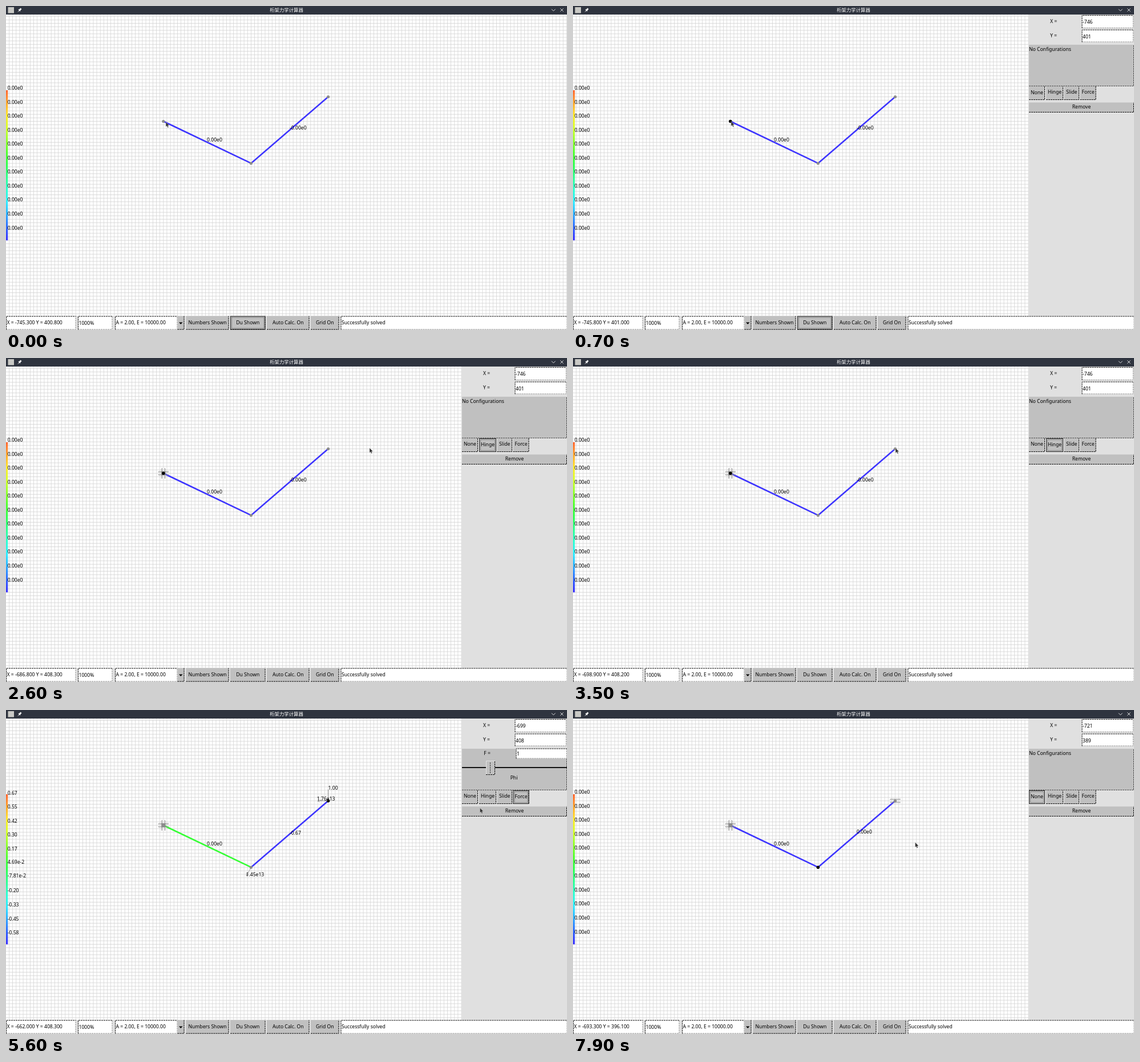
Write an HTML page with a canvas that moves like this. It is 983 by 569 pixels and loops after 8000 ms.

```html
<!DOCTYPE html>
<html lang="zh">
<head>
<meta charset="utf-8">
<title>桁架力学计算器</title>
<style>
html, body { margin: 0; width: 100%; height: 100%; overflow: hidden; background: #e0e0e0 }
canvas { display: block }
</style>
</head>
<body>
<canvas id="stage" width="983" height="569"></canvas>
<script>
const g = document.getElementById('stage').getContext('2d');
const LOOP = 8000, UNIT = 6.144, PANEL = 798;
const FACE = '#c0c0c0', BLUE = '#3c33ff', GREEN = '#33ff33', GRAY = '#8c8c8c';

// World and screen coordinates
const sx = X => 275.8 + (X + 746) * UNIT;
const sy = Y => 202.5 - (Y - 401) * UNIT;
const nodes = [[-746, 401], [-699, 408], [-721, 389]].map(([X, Y]) => ({ X, Y, x: sx(X), y: sy(Y) }));

// Pointer moves: start ms, end ms, x, y
const moves = [
  [0, 200, 278.5, 203], [300, 500, 277, 202.5],
  [800, 1000, 537, 182], [1100, 1300, 750, 176], [1400, 1495, 795, 165], [1500, 1900, 845.5, 153.5],
  [2200, 2600, 637, 158], [2900, 3000, 567.5, 157], [3100, 3495, 565.2, 158.3],
  [3900, 3995, 791.9, 157.6], [4000, 4100, 838, 158.5], [4200, 4700, 900, 155],
  [5500, 5600, 830.5, 172], [5600, 5900, 872, 153], [6100, 6400, 730, 168],
  [6400, 6595, 420.2, 234.4], [6595, 6600, 411.5, 241], [6600, 6700, 425, 268], [6800, 7000, 430, 276],
  [7400, 7600, 470, 262], [7700, 7895, 599.6, 232.6]
];

function pointer(t) {
  let x = 280.1, y = 203.7;
  for (const [a, b, nx, ny] of moves) {
    if (t <= a) break;
    const k = Math.min(1, (t - a) / (b - a));
    x += (nx - x) * k;
    y += (ny - y) * k;
  }
  return { x, y };
}

// The readout trails the pointer and freezes while it is over the panel
function readout(t) {
  let p = pointer(t - 5);
  while (p.x >= PANEL && t > 0) p = pointer((t -= 100) - 5);
  const X = -746 + (p.x - 275.8) / UNIT, Y = 401 - (p.y - 202.5) / UNIT;
  return `X = ${X.toFixed(1)}00 Y = ${Y.toFixed(1)}00`;
}

const format = v => Math.abs(v) < .1 ? v.toExponential(2).replace('+', '') : v.toFixed(2);

function rect(x, y, w, h, color) {
  g.fillStyle = color;
  g.fillRect(x, y, w, h);
}

function line(points, color, width = .7, dash = []) {
  g.beginPath();
  points.forEach(([x, y]) => g.lineTo(x, y));
  g.strokeStyle = color;
  g.lineWidth = width;
  g.setLineDash(dash);
  g.stroke();
  g.setLineDash([]);
}

function text(s, x, y, align = 'left', color = '#000', size = 8.6) {
  g.font = `${size}px "Noto Sans", "Noto Sans CJK SC", sans-serif`;
  g.textAlign = align;
  g.fillStyle = color;
  g.fillText(s, x, y);
}

// Plain decimals sit a little lower than exponent notation
const value = (s, x, y) => text(s, x, y + (s.includes('e') ? 0 : 1.5));

function dot(x, y, r, color) {
  g.beginPath();
  g.arc(x, y, r, 0, 7);
  g.fillStyle = color;
  g.fill();
}

function field(s, x, y, w, h, base = y + 14) {
  rect(x, y, w, h, '#fff');
  line([[x + .5, y + h], [x + .5, y + .5], [x + w, y + .5]], '#111', 1, [3, 1]);
  line([[x, y + h - .5], [x + w - .5, y + h - .5], [x + w - .5, y]], '#777', .8, [3, 1]);
  text(s, x + 1.5, base);
}

function raised(x, y, w, h) {
  rect(x, y, w, h, FACE);
  line([[x, y + h - .5], [x + w - .5, y + h - .5], [x + w - .5, y]], '#111', 1, [3, 1]);
}

function button(s, x, y, w, h, base, focus, pressed) {
  raised(x, y, w, h);
  if (focus) {
    g.strokeStyle = '#222';
    g.lineWidth = 1;
    g.strokeRect(x + .5, y + .5, w - 1, h - 1);
    g.setLineDash([1, 1]);
    g.lineWidth = .7;
    g.strokeRect(x + 2.5, y + 2.5, w - 5, h - 5);
    g.setLineDash([]);
  }
  text(s, x + w / 2, base + (pressed ? .6 : 0), 'center');
}

function titleBar() {
  rect(0, 0, 983, 15, '#2f343f');
  rect(3.5, 2, 10.5, 10.5, '#c9c9c5');
  line([[21, 10.3], [23.3, 7.8]], '#fff', .9);
  line([[22, 6], [25, 9]], '#fff', 1.2);
  line([[23.5, 7.5], [26.5, 4.5]], '#fff', 2.6);
  text('桁架力学计算器', 491.5, 10.3, 'center', '#fff', 8.4);
  line([[956, 5.5], [959.3, 8.8], [962.6, 5.5]], '#eee', .9);
  line([[971.3, 4.3], [976.7, 9.7]], '#eee', .9);
  line([[976.7, 4.3], [971.3, 9.7]], '#eee', .9);
}

function grid() {
  rect(0, 15, 983, 529, '#fff');
  for (let x = sx(-746) % UNIT; x < 983; x += UNIT) rect(x - .4, 15, .8, 529, '#d4d4d4');
  for (let y = 15 + (sy(401) - 15) % UNIT; y < 544; y += UNIT) rect(0, y - .4, 983, .8, '#d4d4d4');
}

function legend(force) {
  const ramp = g.createLinearGradient(0, 148, 0, 411);
  for (let i = 0; i <= 12; i++) ramp.addColorStop(i / 12, `hsl(${15 + 19 * i},100%,60%)`);
  rect(0, 148, 3.3, 263.5, ramp);
  for (let i = 0; i < 11; i++) value(format(force ? .6719 - .125 * i : 0), 2.7, 147 + 24.56 * i);
}

function arrow(x1, y1, x2, y2, color) {
  const a = Math.atan2(y2 - y1, x2 - x1);
  const wing = d => [x2 - 4 * Math.cos(a + d), y2 - 4 * Math.sin(a + d)];
  line([[x1, y1], [x2, y2]], color);
  line([wing(.5), [x2, y2], wing(-.5)], color);
}

// Two rails with hatching outside them
function rails(x, y) {
  for (const s of [-1, 1]) {
    line([[x - 9.5, y + s * 2.4], [x + 9.5, y + s * 2.4]], GRAY, .9);
    for (let i = -8; i <= 8; i += 3) line([[x + i, y + s * 2.4], [x + i + 1.5, y + s * 4.4]], GRAY, .6);
  }
}

function hinge({ x, y }) {
  rails(x, y);
  g.save();
  g.translate(x, y);
  g.rotate(Math.PI / 2);
  rails(0, 0);
  g.restore();
  rect(x - 3.5, y - 3.5, 7, 7, GRAY);
}

function truss(s) {
  const [a, b, c] = nodes;
  line([[a.x, a.y], [c.x, c.y]], s.force ? GREEN : BLUE, 2.5);
  line([[c.x, c.y], [b.x, b.y]], BLUE, 2.5);
  if (s.hinge) hinge(a);
  if (s.slide) rails(b.x, b.y);
  nodes.forEach((n, i) => dot(n.x, n.y, i == s.sel ? 2.8 : 2.6, i == s.sel ? '#000' : GRAY));
  value('0.00e0', 352, 238.4);
  value(s.force ? '-0.67' : s.slide ? '0.00e0' : '-0.00e0', 497, 217);
  if (s.force) {
    line([[b.x, b.y], [b.x, 139.5]], '#555');
    arrow(b.x, b.y, 546, 159.8, '#777');
    arrow(c.x, c.y, 421.5, 291.5, '#777');
    value('1.00', 564.6, 138.8);
    value('1.76e13', 544.8, 158.8);
    value('1.45e13', 420.5, 292.4);
  }
}

function slider(y, knob) {
  rect(799, y - .8, 184, 1.8, '#000');
  raised(knob - 8, y - 12, 16, 25);
  line([[knob - 7.5, y + 12], [knob - 7.5, y - 11.5], [knob + 8, y - 11.5]], '#eee', .8);
  line([[knob - .5, y - 9], [knob - .5, y + 10]], '#333', .9, [3, 1]);
  text('Phi', 890, y + 21.3, 'center');
}

function panel(s) {
  rect(PANEL, 15, 185, 529, '#e0e0e0');
  const n = nodes[s.sel];
  text('X =', 842, 29.8, 'center');
  field(String(n.X), 891.5, 16, 90.5, 23, 31);
  text('Y =', 842, 55.3, 'center');
  field(String(n.Y), 891.5, 41.5, 90.5, 22, 56.5);
  rect(799, 68, 184, 72.5, FACE);
  line([[799, 140.5], [982.5, 140.5], [982.5, 68]], '#333', .8, [3, 1]);
  if (s.tab == 3) {
    text('F =', 843, 79, 'center');
    field('1', 893.5, 67.5, 89.5, 18, 79.8);
    slider(101, 849);
  } else if (s.tab == 2) slider(79.3, 891);
  else text('No Configurations', 799, 78.8);
  const tabs = [['None', 799, 28], ['Hinge', 829, 30], ['Slide', 860.5, 26.5], ['Force', 888.5, 28]];
  tabs.forEach(([name, x, w], i) =>
    button(name, x, 141, w, 24, 154.3, i == s.tab && s.tabFocus, i == s.tab));
  button('Remove', 799, 169.5, 184, 17.5, 180);
}

function bottomBar(t, s) {
  rect(0, 544, 983, 25, '#e0e0e0');
  field(readout(t), 0, 544.5, 122.5, 24, 558.5);
  field('1000%', 126, 544.5, 60.5, 24, 559.5);
  field('A = 2.00, E = 10000.00', 191, 544.5, 109.5, 24, 558.5);
  raised(300.5, 544.5, 12, 24);
  g.beginPath();
  g.moveTo(303, 555.5);
  g.lineTo(309.5, 555.5);
  g.lineTo(306.2, 559);
  g.fillStyle = '#000';
  g.fill();
  button('Numbers Shown', 315.5, 544.5, 75, 24, 558.5);
  button('Du Shown', 393, 544.5, 61.5, 24, 558.5, !s.tabFocus);
  button('Auto Calc. On', 457, 544.5, 74.5, 24, 558.5);
  button('Grid On', 534, 544.5, 49.5, 24, 558.5);
  field('Successfully solved', 586.5, 544.5, 397, 24, 558.5);
}

function cursor({ x, y }) {
  g.save();
  g.translate(x, y);
  g.beginPath();
  [[0, 0], [0, 8.4], [1.9, 6.8], [3.2, 9.8], [4.7, 9.1], [3.4, 6.3], [5.9, 6]].forEach(p => g.lineTo(...p));
  g.closePath();
  g.fillStyle = '#333';
  g.fill();
  g.strokeStyle = '#ddd';
  g.lineWidth = .4;
  g.stroke();
  g.restore();
}

function draw(t) {
  const sel = t < 700 ? -1 : t < 3700 ? 0 : t < 7200 ? 1 : 2;
  const s = {
    sel,
    hinge: t >= 2100,
    force: t >= 4900 && t < 6000,
    slide: t >= 6000,
    tabFocus: t >= 2100
  };
  s.tab = sel == 0 ? +s.hinge : sel == 1 ? (s.force ? 3 : s.slide ? 2 : 0) : 0;
  grid();
  truss(s);
  legend(s.force);
  if (sel >= 0) panel(s);
  titleBar();
  bottomBar(t, s);
  cursor(pointer(t));
}

// The screen refreshes ten times a second
function frame() {
  draw(Math.floor(performance.now() % LOOP / 100) * 100);
  requestAnimationFrame(frame);
}
frame();
</script>
</body>
</html>
```
